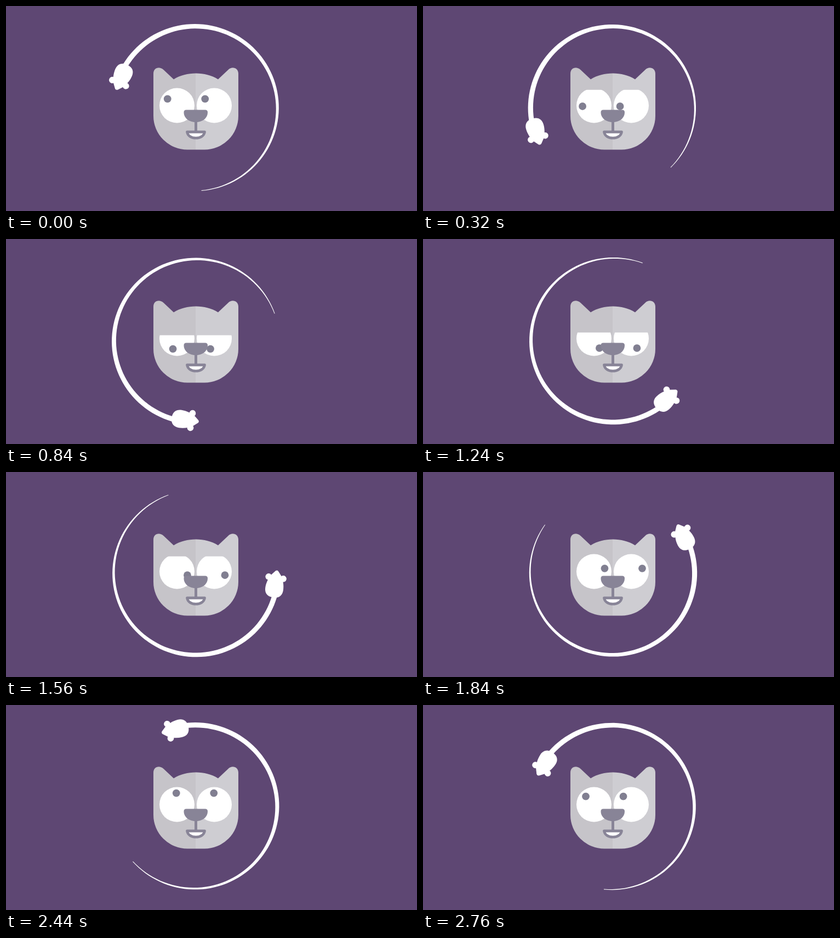
An HTML page for the animation above (2800 ms loop, 750 px wide and 376 px high).

```html
<!DOCTYPE html>
<html lang="en">
<head>
<meta charset="utf-8">
<title>Cat watching a mouse</title>
<style>
  html, body { margin: 0; width: 100%; height: 100%; overflow: hidden; background: #5e4773; }
  svg { display: block; width: 100%; height: 100%; }
</style>
</head>
<body>
<svg viewBox="0 0 750 376">
  <defs>
    <clipPath id="face">
      <path d="M269 124C269 113 280 110 287.500 117L306 134.500C318 127 332 123.500 346.500 123.500S375 127 387 134.500L405.500 117C412 110 424 113 424 124V201.500A62 62 0 0 1 362 263.500H331A62 62 0 0 1 269 201.500Z"/>
    </clipPath>
    <clipPath id="open"><rect id="lid" x="270" y="148" width="160" height="140"/></clipPath>
  </defs>

  <g clip-path="url(#face)">
    <rect x="260" y="105" width="86" height="165" fill="#c6c4c9"/>
    <rect x="346" y="105" width="86" height="165" fill="#cecdd2"/>
  </g>
  <g fill="#fff" clip-path="url(#open)">
    <circle cx="312" cy="182.500" r="32"/>
    <circle cx="380" cy="182.500" r="32"/>
  </g>
  <g id="pupils" fill="#817f91">
    <circle r="6.900"/>
    <circle cx="68.500" r="6.900"/>
  </g>
  <g fill="#888497">
    <path d="M329 190.500H363.500Q368 190.500 368 195C368 206 358 213 346.300 213S324.500 206 324.500 195Q324.500 190.500 329 190.500Z"/>
    <rect x="344" y="210" width="5" height="20"/>
    <path d="M330.500 231H362.500C361.500 238 355 242.200 346.500 242.200S331.500 238 330.500 231Z" fill="#fff" stroke="#888497" stroke-width="4.800" stroke-linejoin="round"/>
  </g>

  <g fill="#fff">
    <path id="tail"/>
    <g id="mouse">
      <path d="M-25 0C-25 -12 -18 -16.500 -9 -16.500C0 -16.500 9 -13.500 16 -9.200L24 -2.500Q26 0 24 2.500L16 9.200C9 13.500 0 16.500 -9 16.500C-18 16.500 -25 12 -25 0Z"/>
      <circle cx="11.500" cy="-13.500" r="5.900"/>
      <circle cx="11.500" cy="13.500" r="5.900"/>
    </g>
  </g>
</svg>
<script>
const LOOP = 2800, STEP = 40;
const TAIL_START = 8, TAIL_END = 242;
const el = id => document.getElementById(id);
const [lid, pupils, tail, mouse] = ['lid', 'pupils', 'tail', 'mouse'].map(el);
const rad = deg => deg * Math.PI / 180;
const polar = (x, y, r, deg) => [x + r * Math.cos(rad(deg)), y + r * Math.sin(rad(deg))];

// Degrees travelled; the last stretch runs slightly faster.
const travel = t => t < 2160 ? t / 8 : 270 + (t - 2160) * 80 / 600;

function tailPath(cx, cy, head) {
  const outer = [], inner = [], n = 80;
  for (let i = 0; i <= n; i++) {
    const s = i / n;
    const a = head + TAIL_START + (TAIL_END - TAIL_START) * s;
    const width = 0.9 + 8.4 * (1 - s ** 1.5);
    outer.push(polar(cx, cy, 153.2, a));
    inner.unshift(polar(cx, cy, 153.2 - width, a));
  }
  return 'M' + outer.concat(inner).map(p => p.map(v => v.toFixed(2)).join(' ')).join('L') + 'Z';
}

function draw(t) {
  const turn = travel(t);
  const head = 203.5 - turn;
  // The ring turns about a point slightly off its own centre.
  const [cx, cy] = polar(346, 186.4, 1.4, head - 18);
  tail.setAttribute('d', tailPath(cx, cy, head));
  mouse.setAttribute('transform', `translate(${polar(cx, cy, 144.8, head - 0.9)}) rotate(${head - 90})`);
  pupils.setAttribute('transform', `translate(${polar(311.6, 182.2, 20.6, 215 - turn)})`);
  lid.setAttribute('y', 148 + 29.3 * Math.sin(rad(head + 5)));
}

const start = performance.now();
function tick() {
  const t = Math.max(0, performance.now() - start) % LOOP;
  draw(Math.floor((t + 1) / STEP) * STEP % LOOP);
  requestAnimationFrame(tick);
}
tick();
</script>
</body>
</html>
```
